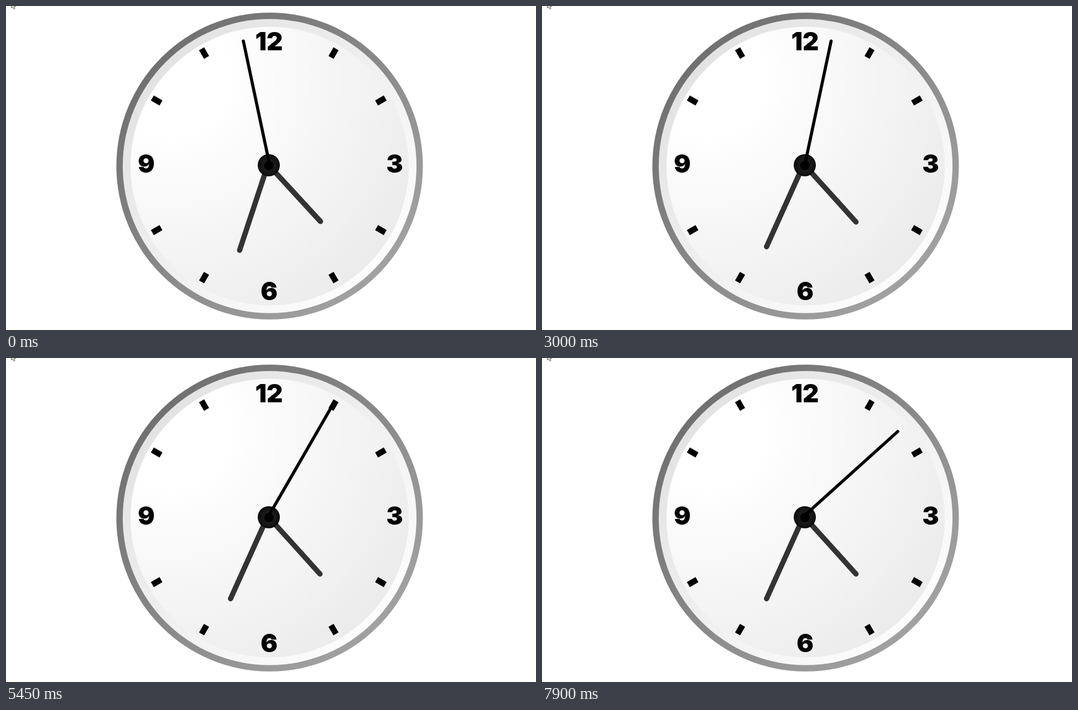
An HTML page for the animation above (8000 ms loop, 958 by 585 pixels).

```html
<!DOCTYPE html>
<html lang="en">
<head>
<meta charset="utf-8">
<title>Wall clock</title>
<style>
html, body { margin: 0; width: 100%; height: 100%; overflow: hidden; background: #fff; }
svg { display: block; width: 100%; height: 100%; }
text { font: 900 45.5px Inter, "Liberation Sans", sans-serif; text-anchor: middle; }
line { stroke-linecap: round; }
</style>
</head>
<body>
<svg viewBox="0 0 958 585">
  <defs>
    <linearGradient id="rim" x1=".12" y1=".12" x2=".88" y2=".88">
      <stop offset="0" stop-color="#6f6f6f"/>
      <stop offset="1" stop-color="#a3a3a3"/>
    </linearGradient>
    <linearGradient id="bevel" x1=".12" y1=".12" x2=".88" y2=".88">
      <stop offset="0" stop-color="#e2e2e2"/>
      <stop offset="1" stop-color="#fdfdfd"/>
    </linearGradient>
    <radialGradient id="face" gradientUnits="userSpaceOnUse" cx="300" cy="130" r="500">
      <stop offset=".2" stop-color="#fff"/>
      <stop offset="1" stop-color="#ebebeb"/>
    </radialGradient>
    <radialGradient id="hub">
      <stop offset=".4" stop-color="#1b1b1b"/>
      <stop offset=".8" stop-color="#141414"/>
      <stop offset="1" stop-color="#0a0a0a"/>
    </radialGradient>
  </defs>

  <path d="M9.5-8V4L12 1.5L14 5.5L16 4.5L14.2.5H18Z" fill="#fff" stroke="#555" stroke-width="1"/>

  <circle cx="476.5" cy="289" r="277" fill="url(#rim)"/>
  <circle cx="476.5" cy="289" r="265.5" fill="url(#bevel)"/>
  <circle cx="476.5" cy="289" r="251.5" fill="url(#face)"/>
  <g id="ticks"></g>

  <text x="475.5" y="80">12</text>
  <text x="702.5" y="300.5">3</text>
  <text x="475.5" y="531">6</text>
  <text x="253.5" y="300.5">9</text>

  <g stroke="#333" stroke-width="9.5">
    <line id="hour"/>
    <line id="minute"/>
  </g>
  <circle cx="475" cy="287.5" r="20" fill="url(#hub)"/>
  <circle cx="475" cy="288" r="8.5"/>
  <line id="second" stroke="#000" stroke-width="5.6"/>
</svg>
<script>
const LOOP = 8000;
const BEATS = [650, 1400, 2250, 3000, 3850, 4650, 5450, 6250, 7100, 7900];
const FIRST_SECOND = -2;
const $ = id => document.getElementById(id);

function setHand(id, x, y, length, degrees) {
  const a = degrees * Math.PI / 180;
  const ends = { x1: x, y1: y, x2: x + length * Math.sin(a), y2: y - length * Math.cos(a) };
  for (const key in ends) $(id).setAttribute(key, ends[key].toFixed(2));
}

function drawTicks() {
  let marks = "";
  for (let h = 1; h < 12; h++) {
    if (h % 3) marks += `<rect x="469.7" y="44.7" width="10.6" height="18" transform="rotate(${h * 30} 475 287.7)"/>`;
  }
  $("ticks").innerHTML = marks;
}

function render(time) {
  const second = FIRST_SECOND + BEATS.filter(beat => time >= beat).length;
  const minute = second < 0 ? 33 : 34;
  setHand("second", 475.8, 283.3, 225, second * 6);
  setHand("minute", 475, 281.5, 168, minute * 6 + 0.3);
  setHand("hour", 475, 287.5, 138, 120.9 + minute / 2);
}

drawTicks();
render(0);
const start = performance.now();
(function frame() {
  render((performance.now() - start) % LOOP);
  requestAnimationFrame(frame);
})();
</script>
</body>
</html>
```
